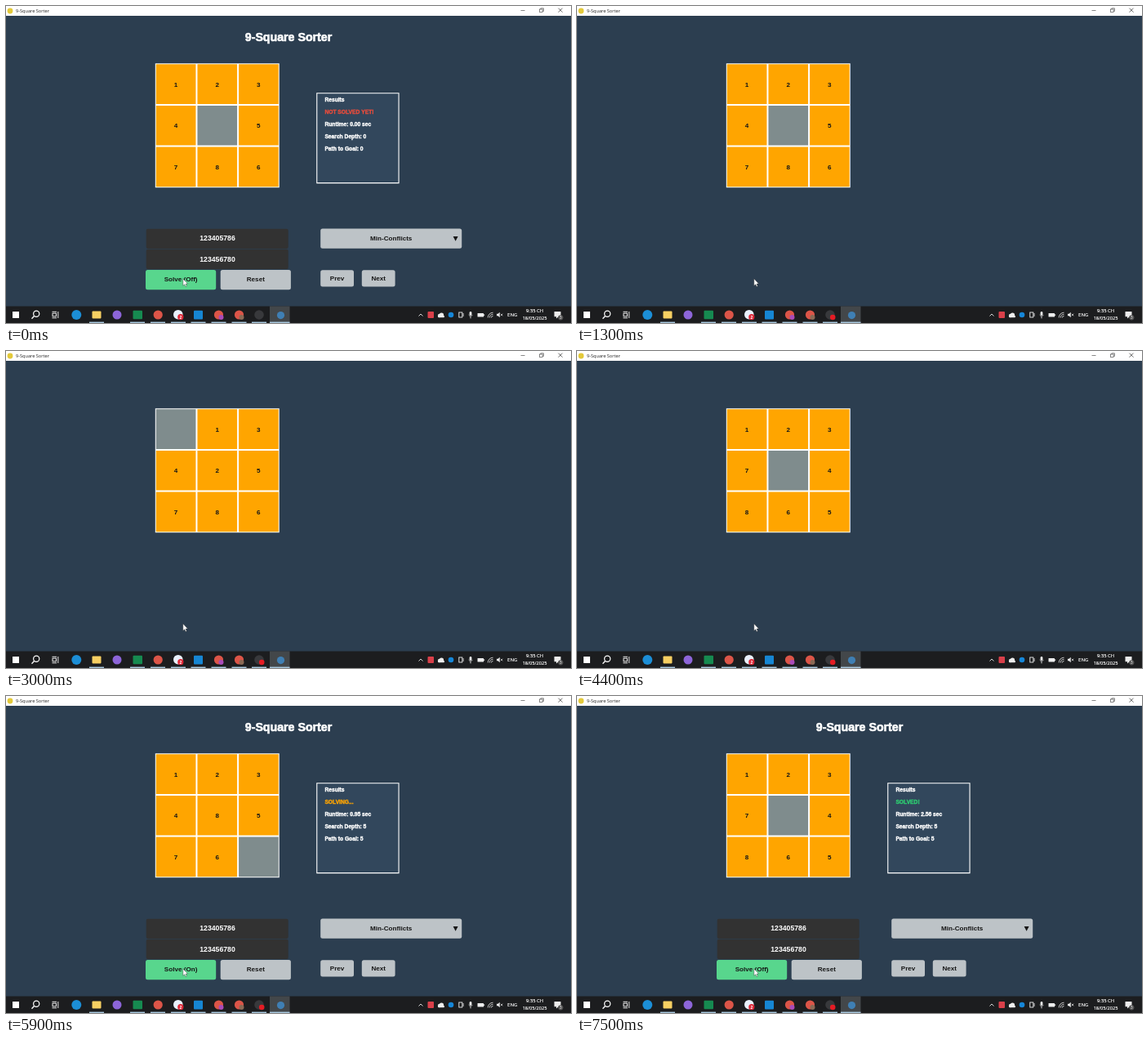
Write an HTML page with a canvas that moves like this. It is 692 px wide and 388 px high and loops after 8000 ms.

```html
<!DOCTYPE html>
<html lang="en">
<head>
<meta charset="utf-8">
<title>9-Square Sorter</title>
<style>
  html, body { margin: 0; width: 100%; height: 100%; overflow: hidden; background: #2c3e50; }
  canvas { display: block; width: 692px; height: 388px; }
</style>
</head>
<body>
<canvas id="stage" width="692" height="388"></canvas>
<script>
const ctx = document.getElementById('stage').getContext('2d');
const LOOP = 8000;
const APP = '9-Square Sorter';
const BOLD = 'bold SIZEpx "Liberation Sans", Arial, sans-serif';
const PLAIN = 'SIZEpx "Open Sans", "Noto Sans", sans-serif';

// Boards read row by row, 0 is the gap.
const START = '123405786';
const PATH = ['123485760', '013425786', '123705846', '123805476', '123704865'];

const SHOW = { hide: 1300, first: 2000, step: 600 };
const RUN = { start: 5000, step: 500, end: 7500 };

function rect(x, y, w, h, fill, radius = 0) {
  ctx.fillStyle = fill;
  ctx.beginPath();
  ctx.roundRect(x, y, w, h, radius);
  ctx.fill();
}

function disc(x, y, r, fill) {
  ctx.fillStyle = fill;
  ctx.beginPath();
  ctx.arc(x, y, r, 0, 7);
  ctx.fill();
}

function line(points, color, width = 1, closed = false) {
  ctx.beginPath();
  points.forEach(([x, y]) => ctx.lineTo(x, y));
  if (closed) ctx.closePath();
  ctx.strokeStyle = color;
  ctx.lineWidth = width;
  ctx.stroke();
}

function shape(points, fill) {
  ctx.beginPath();
  points.forEach(([x, y]) => ctx.lineTo(x, y));
  ctx.fillStyle = fill;
  ctx.fill();
}

function text(str, x, y, size, color, { font = BOLD, align = 'center', weight = 0 } = {}) {
  ctx.font = font.replace('SIZE', size);
  ctx.textAlign = align;
  ctx.textBaseline = 'alphabetic';
  ctx.fillStyle = color;
  const base = y + size * 0.36;
  ctx.fillText(str, x, base);
  if (weight) {
    ctx.strokeStyle = color;
    ctx.lineWidth = weight;
    ctx.strokeText(str, x, base);
  }
}

function button(label, x, y, w, h, fill = '#bdc3c7') {
  rect(x, y, w, h, fill, 2.5);
  text(label, x + w / 2, y + h / 2 - 0.6, 8.1, '#161616');
}

function drawTitleBar() {
  rect(0, 0, 692, 12, '#fff');
  disc(5, 6, 3.4, '#e3c93a');
  text(APP, 12, 6, 5.6, '#222', { font: PLAIN, align: 'left' });
  line([[630.5, 5.5], [635.5, 5.5]], '#555', 0.7);
  ctx.strokeStyle = '#555';
  ctx.lineWidth = 0.7;
  ctx.strokeRect(653.5, 4, 3.6, 3.6);
  line([[654.8, 4], [654.8, 2.8], [658.4, 2.8], [658.4, 6.4], [657.1, 6.4]], '#555', 0.7);
  line([[676.5, 2.7], [681.5, 7.7]], '#444', 0.8);
  line([[681.5, 2.7], [676.5, 7.7]], '#444', 0.8);
}

function drawBoard(board) {
  const left = 182.8, top = 70.3, pitch = 50.65;
  rect(left, top, pitch * 3, pitch * 3, '#fff');
  [...board].forEach((digit, i) => {
    const x = left + (i % 3) * pitch, y = top + Math.floor(i / 3) * pitch;
    rect(x + 1, y + 1, pitch - 2, pitch - 2, digit === '0' ? '#7f8c8d' : '#ffa500');
    if (digit !== '0') text(digit, x + pitch / 2 - 0.1, y + pitch / 2 + 0.1, 8.1, '#161616');
  });
}

function drawResults(state) {
  rect(380.2, 106.2, 101.4, 111, '#fff');
  rect(381.3, 107.3, 99.2, 108.8, '#32475c');
  const rows = [
    ['Results', '#fff'],
    [state.status, state.color],
    [`Runtime: ${state.runtime.toFixed(2)} sec`, '#fff'],
    [`Search Depth: ${state.depth}`, '#fff'],
    [`Path to Goal: ${state.depth}`, '#fff']
  ];
  rows.forEach(([label, color], i) =>
    text(label, 390.4, 114.4 + i * 15.1, 6.7, color, { align: 'left', weight: 0.4 }));
}

function drawControls(state) {
  text(APP, 346, 38, 14.2, '#fff', { weight: 0.6 });
  drawResults(state);
  rect(171.7, 272.7, 174, 24.3, '#323232', 2);
  rect(171.7, 297.7, 174, 24.3, '#323232', 2);
  text(START, 259, 284.2, 8.7, '#fff');
  text('123456780', 259, 309.4, 8.7, '#fff');
  button(`Solve (${state.running ? 'On' : 'Off'})`, 171, 323, 86.2, 24.2, '#58d68d');
  button('Reset', 262.7, 323, 86.2, 24.2);
  button('Min-Conflicts', 385.2, 272.6, 173, 24.2);
  shape([[547.6, 282], [553.6, 282], [550.6, 287.8]], '#161616');
  button('Prev', 385.2, 323.2, 40.8, 20.4);
  button('Next', 435.8, 323.2, 40.8, 20.4);
}

function drawTray() {
  const ink = '#eee';
  line([[505.5, 379.5], [508, 377], [510.5, 379.5]], ink, 0.9);
  rect(516.5, 374, 7.5, 8, '#d9404a', 1);
  disc(531, 379, 2.2, ink);
  disc(533.4, 378.2, 2.7, ink);
  rect(529, 379, 8, 2.3, ink, 1);
  disc(545, 378, 3.3, '#1687d9');
  ctx.strokeStyle = ink;
  ctx.lineWidth = 0.9;
  ctx.strokeRect(554.8, 375, 4, 6);
  line([[560, 376], [560, 380]], ink, 0.9);
  rect(567.6, 374, 2.8, 5, ink, 1.4);
  line([[566.6, 378], [569, 380.4], [571.4, 378]], ink, 0.7);
  line([[569, 380], [569, 382.5]], ink, 0.8);
  rect(577.5, 376, 7.5, 4.5, ink, 0.5);
  rect(585.2, 377.3, 0.9, 2, ink);
  for (let i = 1; i <= 3; i++) {
    ctx.beginPath();
    ctx.arc(596.5, 381.5, i * 2.1, Math.PI, Math.PI * 1.5);
    ctx.strokeStyle = ink;
    ctx.stroke();
  }
  shape([[601, 376.8], [602.6, 376.8], [604.7, 374.8], [604.7, 381.2], [602.6, 379.2], [601, 379.2]], ink);
  line([[605.8, 376.7], [608.3, 379.3]], ink, 0.7);
  line([[608.3, 376.7], [605.8, 379.3]], ink, 0.7);
  const label = { font: PLAIN, weight: 0.15 };
  text('ENG', 620.2, 378, 6.1, '#fff', label);
  text('9:35 CH', 647.5, 373.4, 5.8, '#fff', label);
  text('18/05/2025', 647.5, 382.2, 5.6, '#fff', label);
  rect(671.5, 374, 8, 6.3, ink, 0.5);
  shape([[674, 380], [677, 380], [674, 382.5]], ink);
  disc(679.3, 381.3, 3.1, '#555');
  text('3', 679.3, 381.3, 4.5, '#fff', { font: PLAIN });
}

function drawTaskbar(recording) {
  rect(0, 367.5, 692, 20.5, '#1c1d1f');
  rect(323, 367.5, 24.5, 20.5, '#43474a');
  rect(8, 374, 8, 8, '#fff');

  ctx.beginPath();
  ctx.arc(37.2, 376.8, 3.6, 0, 7);
  ctx.strokeStyle = '#fff';
  ctx.lineWidth = 1.2;
  ctx.stroke();
  line([[34.5, 379.5], [31.5, 382.8]], '#fff', 1.3);
  ctx.lineWidth = 0.9;
  ctx.strokeRect(57, 376.2, 4.5, 3.6);
  line([[56.5, 374.3], [62, 374.3]], '#fff', 0.9);
  line([[56.5, 381.8], [62, 381.8]], '#fff', 0.9);
  line([[63.8, 374], [63.8, 382]], '#fff', 0.9);

  disc(86.3, 378, 6, '#1c8ed6');
  rect(105.5, 373.5, 11, 9, '#f6cf62', 1);
  disc(136, 378, 5.5, '#8d65d8');
  rect(155.5, 372.7, 11.5, 10.5, '#168a50', 1);
  [186.2, 260.5, 285.5].forEach(x => disc(x, 378, 5.6, '#dc5548'));
  disc(210.8, 377.7, 5.8, '#e9f0fb');
  disc(213.8, 380.7, 3.6, '#df2938');
  text('2', 213.8, 380.8, 5, '#fff');
  rect(230, 372.8, 11, 10.6, '#1686d3', 1);
  disc(263.5, 381, 3, '#a94ab8');
  disc(288.5, 381, 3, '#8b6a55');
  disc(310, 378, 5.8, '#38393c');
  if (recording) disc(313.2, 381, 3.3, '#e51c24');
  disc(336.5, 378.6, 4.6, '#3f7fb4');

  [111, 161, 186, 211, 235.5, 260.5, 285.5, 310].forEach(x => rect(x - 9, 386.6, 18, 1.4, '#a9c9e0'));
  rect(323, 386.6, 24.5, 1.4, '#a9c9e0');
  drawTray();
}

function drawCursor() {
  const arrow = [[216.8, 333.8], [216.8, 342.4], [218.7, 340.7], [220, 343.5], [221.3, 342.9], [220.1, 340.1], [222.6, 340]];
  shape(arrow, '#fff');
  line(arrow, '#222', 0.4, true);
}

function boardAt(t) {
  const [from, step] = t < RUN.start ? [SHOW.first, SHOW.step] : [RUN.start + RUN.step, RUN.step];
  const index = Math.floor((t - from) / step);
  return index < 0 ? START : PATH[Math.min(index, PATH.length - 1)];
}

function stateAt(t) {
  if (t < RUN.start) return { status: 'NOT SOLVED YET!', color: '#e74c3c', runtime: 0, depth: 0 };
  const tick = Math.min(Math.floor(t / 100) * 100, RUN.end);
  const running = t < RUN.end;
  return {
    running,
    status: running ? 'SOLVING...' : 'SOLVED!',
    color: running ? '#ffa500' : '#2ecc71',
    runtime: 0.95 + (tick - 5900) * 1.61 / 1600,
    depth: PATH.length
  };
}

function draw(t) {
  rect(0, 0, 692, 388, '#2c3e50');
  drawTitleBar();
  drawBoard(boardAt(t));
  if (t < SHOW.hide || t >= RUN.start) drawControls(stateAt(t));
  drawTaskbar(t >= 300);
  drawCursor();
}

const origin = performance.now();
function frame() {
  draw((performance.now() - origin) % LOOP);
  requestAnimationFrame(frame);
}
frame();
</script>
</body>
</html>
```
